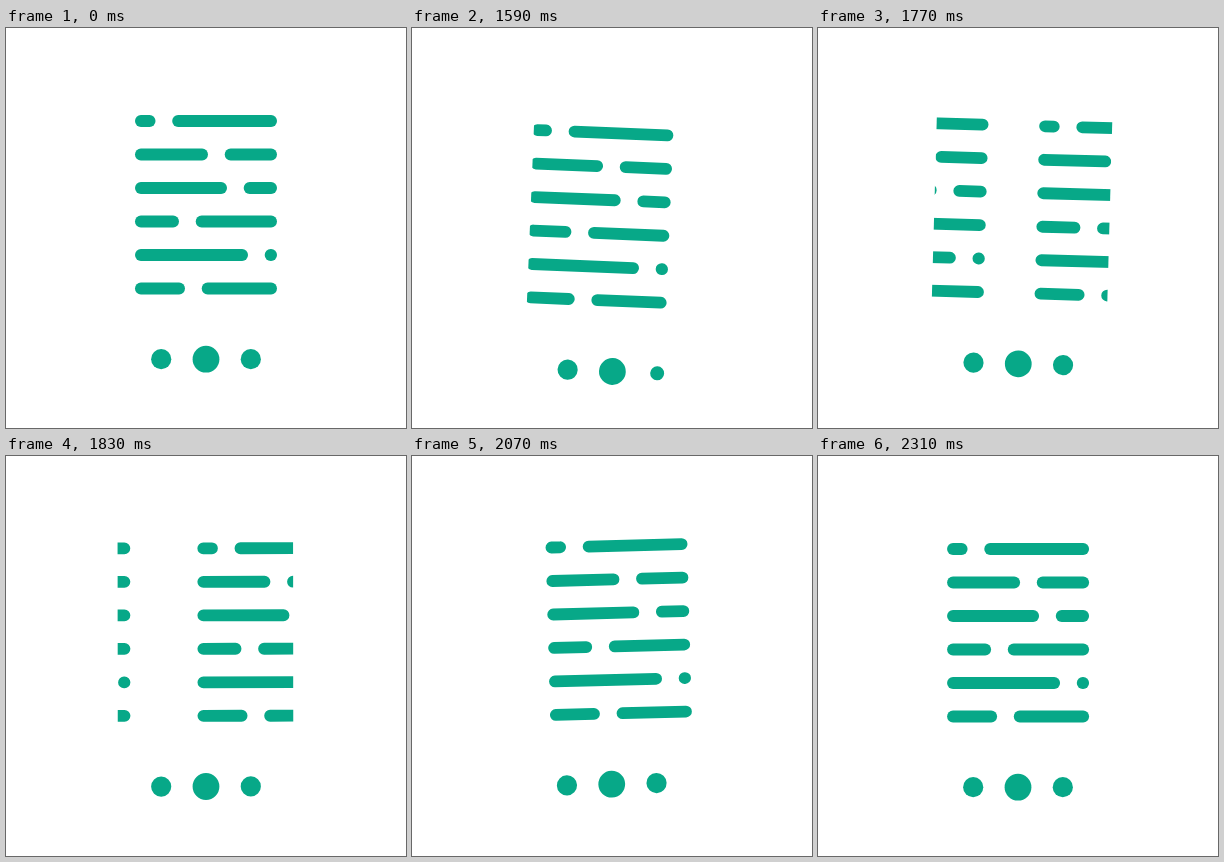
An HTML page for the animation above (2340 ms loop, 400x400 px).

```html
<!DOCTYPE html>
<html lang="en">
<head>
<meta charset="utf-8">
<title>Page turn</title>
<style>
  html, body { margin: 0; width: 100%; height: 100%; overflow: hidden; background: #fff; }
  svg { display: block; width: 100%; height: 100%; }
</style>
</head>
<body>
<svg viewBox="0 0 400 400" fill="#07a888">
  <defs>
    <clipPath id="screen"><rect x="111.8" y="40" width="175.5" height="260"/></clipPath>
    <g id="page" stroke="#07a888" stroke-width="11.8" stroke-linecap="round"></g>
  </defs>
  <g id="reader">
    <g clip-path="url(#screen)">
      <use id="oldPage" href="#page"/>
      <use id="newPage" href="#page"/>
    </g>
    <circle cx="155.2" cy="331.2" r="10.1"/>
    <circle cx="200" cy="331.2" r="13.4"/>
    <circle id="button" cx="244.8" cy="331.2" r="10.1"/>
  </g>
</svg>
<script>
const LOOP = 2340, STEP = 30, START = 1500;
const el = id => document.getElementById(id);

// Each text line spans the same width, with one gap after the first part.
const LEFT = 129, RIGHT = 271, GAP = 16.7, CAP = 5.9;
const firstEnds = [149.5, 202, 221, 173, 242, 179];

function addBar(from, to, y) {
  const line = document.createElementNS('http://www.w3.org/2000/svg', 'path');
  line.setAttribute('d', `M${from + CAP} ${y}H${Math.max(to - CAP, from + CAP + 0.01)}`);
  el('page').append(line);
}

firstEnds.forEach((end, row) => {
  const y = 93 + row * 33.5;
  addBar(LEFT, end, y);
  addBar(end + GAP, RIGHT, y);
});

// Keys are [ms after the press starts, value].
const tilt = [[0, 0], [30, 0.5], [90, 2.3], [165, 4], [210, 3.15], [330, -0.05],
              [430, -2.2], [570, -1.5], [810, 0]];
const drop = [[0, 0], [30, 3.3], [90, 12.3], [125, 13.4], [210, 10], [330, -0.7],
              [430, -4.6], [570, -3], [810, 0]];
const radius = [[0, 10.1], [30, 8], [72, 6.8], [90, 7], [165, 10.1]];

// Smooth curve through the keys, without overshoot between them.
function curve(keys, t) {
  const last = keys.length - 1;
  if (t <= keys[0][0]) return keys[0][1];
  if (t >= keys[last][0]) return keys[last][1];
  const slope = i => (keys[i + 1][1] - keys[i][1]) / (keys[i + 1][0] - keys[i][0]);
  const tangent = i => {
    if (i === 0 || i === last) return 0;
    const a = slope(i - 1), b = slope(i);
    return a * b > 0 ? 2 * a * b / (a + b) : 0;
  };
  const i = keys.findIndex(key => key[0] > t) - 1;
  const [t0, v0] = keys[i], [t1, v1] = keys[i + 1];
  const span = t1 - t0, u = (t - t0) / span, w = 1 - u;
  return v0 * w * w * (1 + 2 * u) + v1 * u * u * (3 - 2 * u)
       + span * u * w * (tangent(i) * w - tangent(i + 1) * u);
}

function draw(time) {
  const t = Math.max(0, Math.floor((time % LOOP + 0.01) / STEP) * STEP - START);
  const oldX = -146.5 * (t / 330) ** 1.55;
  const newX = 113 * ((865 - t) / 655) ** 2.92;
  el('reader').setAttribute('transform',
    `translate(0 ${curve(drop, t)}) rotate(${curve(tilt, t)} 200 341)`);
  el('oldPage').setAttribute('x', oldX);
  el('newPage').setAttribute('x', newX);
  el('button').setAttribute('r', curve(radius, t));
}

const began = performance.now();
function tick() {
  draw(performance.now() - began);
  requestAnimationFrame(tick);
}
tick();
</script>
</body>
</html>
```
